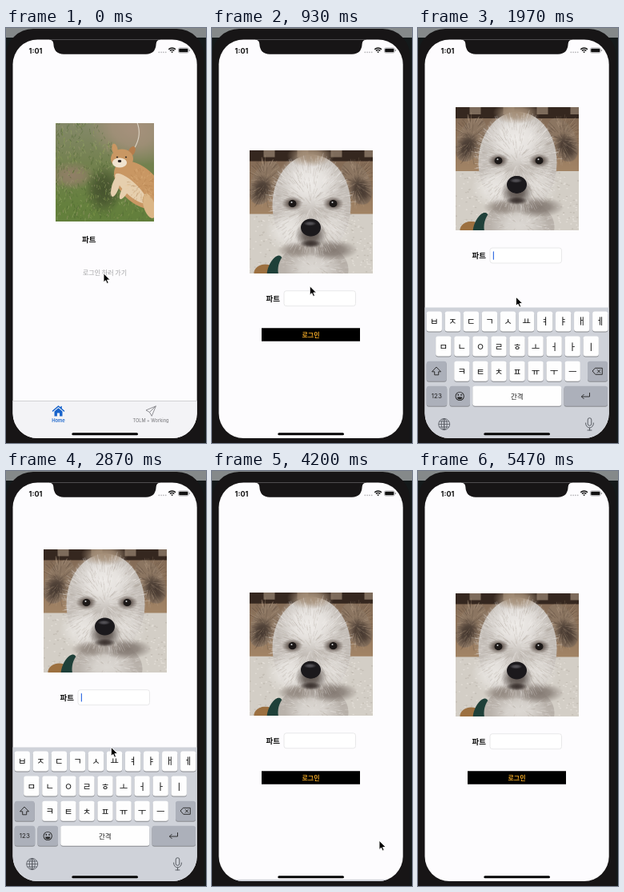
Recreate the animation shown at these times as an HTML page with a canvas. Size 250 by 519 pixels, loop 5510 ms.

```html
<!DOCTYPE html>
<html lang="ko">
<head>
<meta charset="utf-8">
<title>Login screen</title>
<style>
html, body { margin: 0; width: 100%; height: 100%; overflow: hidden; background: #171516; }
canvas { display: block; width: 250px; height: 519px; }
</style>
</head>
<body>
<canvas id="stage"></canvas>
<script>
const W = 250, H = 519, LOOP = 5510;
const SHEET_UP = 97, CARET_ON = 1640, KEYS_UP = 1663, KEYS_DOWN = 3868;
const SCREEN = { x: 8.5, y: 14.5, w: 230.2, h: 498.5 };
const KO = '"Noto Sans CJK KR", "Noto Sans CJK", sans-serif';
const LATIN = 'Inter, sans-serif';
const TAU = Math.PI * 2;
const dpr = window.devicePixelRatio || 1;

const canvas = document.getElementById('stage');
canvas.width = W * dpr;
canvas.height = H * dpr;
const main = canvas.getContext('2d');
let c = main;

// ---------- helpers ----------
function box(x, y, w, h, r, fill, stroke, lw = 1) {
  c.beginPath();
  c.roundRect(x, y, w, h, r);
  if (fill) { c.fillStyle = fill; c.fill(); }
  if (stroke) { c.strokeStyle = stroke; c.lineWidth = lw; c.stroke(); }
}

function band(y, h, fill) {
  c.fillStyle = fill;
  c.fillRect(0, y, W, h);
}

function text(str, x, cy, size, color, font = KO, weight = 400, align = 'center') {
  c.font = `${weight} ${size}px ${font}`;
  c.textAlign = align;
  c.fillStyle = color;
  c.fillText(str, x, cy + size * 0.37);
}

function icon(d, x, y, stroke, fill, lw = 0.9) {
  const p = new Path2D(d);
  c.save();
  c.translate(x, y);
  c.lineJoin = c.lineCap = 'round';
  if (fill) { c.fillStyle = fill; c.fill(p); }
  if (stroke) { c.strokeStyle = stroke; c.lineWidth = lw; c.stroke(p); }
  c.restore();
}

function oval(fill, x, y, rx, ry = rx, turn = 0) {
  c.beginPath();
  c.ellipse(x, y, rx, ry, turn, 0, TAU);
  c.fillStyle = fill;
  c.fill();
}

// oval that fades out towards its rim
function soft(color, x, y, rx, ry = rx, turn = 0) {
  const g = c.createRadialGradient(0, 0, 0, 0, 0, 1);
  g.addColorStop(0, color);
  g.addColorStop(0.45, color + 'cc');
  g.addColorStop(1, color + '00');
  c.save();
  c.translate(x, y);
  c.rotate(turn);
  c.scale(rx, ry);
  oval(g, 0, 0, 1);
  c.restore();
}

function fade(...colors) {
  const g = c.createLinearGradient(0, 0, 0, 154);
  colors.forEach((col, i) => g.addColorStop(i / (colors.length - 1), col));
  return g;
}

let seed = 71;
const rnd = () => (seed = (seed * 16807) % 2147483647) / 2147483647;
const pick = list => list[Math.floor(rnd() * list.length)];

function strand(color, x, y, dx, dy, lw) {
  c.strokeStyle = color;
  c.lineWidth = lw;
  c.beginPath();
  c.moveTo(x, y);
  c.lineTo(x + dx, y + dy);
  c.stroke();
}

// hairs growing outwards from the middle of an oval
function fur(colors, x, y, rx, ry, count, len) {
  c.globalAlpha = 0.3;
  for (let i = 0; i < count; i++) {
    const a = rnd() * TAU, r = Math.sqrt(rnd()), l = len * (0.5 + rnd());
    const dx = Math.cos(a), dy = Math.sin(a);
    strand(pick(colors), x + dx * rx * r, y + dy * ry * r, dx * l, dy * l, 0.8);
  }
  c.globalAlpha = 1;
}

function picture(size, paint) {
  const pic = document.createElement('canvas');
  pic.width = pic.height = Math.ceil(size * dpr * 2);
  c = pic.getContext('2d');
  c.scale(pic.width / size, pic.width / size);
  paint(size);
  c = main;
  return pic;
}

const clamp = u => Math.max(0, Math.min(1, u));
const spring = ms => {
  const u = Math.max(0, ms) * 0.01826;
  return 1 - (1 + u) * Math.exp(-u);
};

// ---------- photographs ----------
const lawnPhoto = picture(123, s => {
  band(0, s, fade('#85896a', '#73814f', '#65803e', '#5f7d38'));
  soft('#a6917c', 96, 8, 58, 44, 0.3);
  soft('#917f67', 20, 66, 30, 18);
  soft('#47532f', 60, 84, 24, 32);
  const blades = ['#465f2b', '#8ca052', '#9bab6c', '#596f3b', '#a59b79'];
  c.globalAlpha = 0.5;
  for (let i = 0; i < 900; i++) {
    const x = rnd() * s, y = rnd() * s;
    if (y > x - 45) strand(pick(blades), x, y, rnd() * 5 - 2.5, -1 - rnd() * 4, 0.9);
  }
  c.globalAlpha = 1;
  icon('M102 0 Q109 18 95 37', 0, 0, '#ded5c6', null, 1.1);
  const tan = '#c99763', cream = '#e6cfae';
  oval(tan, 104, 78, 37, 22, 0.75);
  oval(cream, 94, 82, 26, 8, 0.75);
  oval(cream, 75, 79, 4.5, 14, 0.3);
  oval(cream, 87, 84, 4, 13, 0.5);
  oval('#dbb687', 117, 104, 7, 16, -0.3);
  oval(tan, 74, 33, 3.5, 7, -0.2);
  oval('#b57d4c', 95, 36, 4, 7, 0.5);
  oval(tan, 83, 45, 14, 12);
  oval('#f0e3cf', 80, 50, 9, 6);
  for (const x of [77, 88]) oval('#2e2520', x, 43, 1.2, 0.9);
  oval('#2c2422', 80, 48, 2.2, 1.6);
  fur(['#edca96', '#a77342'], 108, 78, 18, 18, 120, 3);
});

const puppyPhoto = picture(154, s => {
  band(0, s, fade('#7d6653', '#a18365', '#b5854f'));
  band(0, 14, '#35271f');
  for (let x = 18; x < s; x += 42) box(x, 0, 14, 9, 0, '#7d6b5b');
  band(80, s, '#d3cec6');
  for (let i = 0; i < 300; i++) oval(pick(['#e2ddd6', '#c4beb5']), rnd() * s, 82 + rnd() * 72, 1.2, 0.8);
  oval('#9c7040', 20, 154, 14, 11);
  oval('#1f4039', 32, 148, 8, 17, 0.4);

  const white = ['#f8f6f3', '#e9e6e1', '#a89f96'];
  oval('#b9b2ab', 80, 150, 44, 34);
  soft('#dcd8d3', 80, 148, 36, 24);
  fur(white, 80, 146, 40, 24, 160, 5);
  for (const side of [-1, 1]) {
    const x = 77 + side * 57;
    oval('#8b7561', x, 41, 17, 29, side * -0.45);
    soft('#453830', x + side * 5, 50, 14, 20, side * -0.45);
    fur(['#bda68e', '#4c3d32', '#937d68'], x, 41, 16, 25, 220, 7);
  }
  oval('#c4beb8', 78, 69, 49, 63);
  soft('#eeebe8', 76, 40, 42, 38);
  soft('#a58f78', 77, 7, 30, 14);
  soft('#eae7e3', 50, 100, 30, 27);
  soft('#dfdbd6', 103, 99, 26, 25);
  soft('#847a73', 104, 125, 32, 13);
  soft('#958b83', 59, 125, 24, 10);
  fur(white, 77, 69, 48, 58, 900, 7);
  for (const x of [54, 105]) {
    soft('#5d514a', x, 67, 13, 9);
    oval('#1c1817', x, 67, 5, 4.6);
    oval('#d5d8da', x - 1, 65.5, 1);
  }
  soft('#5b524d', 77, 106, 20, 18);
  oval('#1b191c', 77, 97, 12.5, 11);
  soft('#57555a', 76, 92, 8, 3);
  soft('#3b322f', 77, 117, 13, 5);
});

// ---------- screens ----------
function home() {
  band(14, 500, '#fdfcfe');
  c.drawImage(lawnPhoto, 62, 118.5, 123, 123);
  text('파트', 95, 264, 9.5, '#111', KO, 700, 'left');
  text('로그인 하러 가기', 123.5, 306, 8, '#a3a3a5');
  band(466, 50, '#f3f3f6');
  band(466, 0.7, '#c3c3c6');
  const blue = '#1763cb', gray = '#858589';
  icon('M-7 0 L0 -6 L7 0 M3.6 -5.5 V-3', 65.5, 479, blue, null, 1.5);
  icon('M-5 .5 L0 -3.8 L5 .5 V6.5 H1.6 V2.5 H-1.6 V6.5 H-5 Z', 65.5, 479, null, blue);
  text('Home', 65.5, 491, 5.8, blue, LATIN, 600);
  icon('M6 -6 L-6 -1 L-1.5 1.5 L1 6 Z L-1.5 1.5', 181, 479, gray);
  text('TOLM + Working', 181, 491, 5.6, gray, LATIN, 500);
}

function login(t, keys) {
  band(14, 520, '#fdfcfe');
  box(62, 375.3, 123, 16.4, 0, '#000');
  text('로그인', 123.5, 383.7, 8, '#e5a023', KO, 700);
  c.save();
  c.translate(0, -55 * keys);
  c.drawImage(puppyPhoto, 46.5, 152.5, 154, 154);
  text('파트', 67.5, 338, 9.5, '#111', KO, 700, 'left');
  box(90, 328.7, 89.5, 19, 3, '#fff', '#e2e2e4', 0.8);
  if (t > CARET_ON && t < KEYS_DOWN) {
    c.globalAlpha = clamp(0.8 + 3 * Math.sin((t - CARET_ON) / 1060 * TAU));
    box(93.8, 333, 1.2, 10.5, 0.6, '#3970e3');
  }
  c.restore();
}

// ---------- keyboard ----------
const PITCH = 23.05, ROW = 31.1, DARK = '#acb0ba', INK = '#222';
const rowY = r => 5 + r * ROW;

function key(x, r, w, label, size = 11.5, fill = '#fefefe') {
  const y = rowY(r);
  box(x, y + 1, w, 25, 3, '#898b90');
  box(x, y, w, 25, 3, fill);
  if (label) text(label, x + w / 2, y + 12.7, size, '#111');
}

function face(x, y) {
  oval(INK, x, y, 5.6);
  oval(DARK, x, y, 4.7);
  for (const side of [-1, 1]) oval(INK, x + side * 1.9, y - 1.7, 0.8, 1.1);
  icon('M-3 0 H3 A3 3 0 0 1 -3 0 Z', x, y + 1, null, INK);
}

function globe(x, y, r, color) {
  c.strokeStyle = color;
  c.lineWidth = 0.8;
  for (const k of [1, 0.5, 0]) {
    c.beginPath();
    c.ellipse(x, y, r * k, r, 0, 0, TAU);
    c.stroke();
  }
  for (const k of [-0.5, 0, 0.5]) {
    const half = r * Math.sqrt(1 - k * k);
    strand(color, x - half, y + r * k, 2 * half, 0, 0.8);
  }
}

function keyboard(top) {
  c.save();
  c.translate(0, top);
  band(0, 190, '#cfd2d9');
  ['ㅂㅈㄷㄱㅅㅛㅕㅑㅐㅔ', 'ㅁㄴㅇㄹㅎㅗㅓㅏㅣ', 'ㅋㅌㅊㅍㅠㅜㅡ'].forEach((row, r) => {
    const left = 125.9 - row.length * PITCH / 2;
    [...row].forEach((ch, i) => key(left + i * PITCH, r, 19.3, ch));
  });
  for (const x of [10.7, 212]) key(x, 2, 25, '', 0, DARK);
  for (const x of [10.7, 39.5]) key(x, 3, 25.5, '', 0, DARK);
  key(68.3, 3, 111, '간격', 8.5);
  key(182.5, 3, 54.5, '', 0, DARK);
  text('123', 23.4, 111, 8, INK, LATIN);
  face(52.2, 111);
  icon('M0 -5 L5.3 .5 H2.5 V4.5 H-2.5 V.5 H-5.3 Z', 23.2, 79.8, INK);
  icon('M-2.5 -4 H6 V4 H-2.5 L-6 0 Z M0 -1.8 L3.5 1.8 M3.5 -1.8 L0 1.8', 224.3, 79.8, INK);
  icon('M5 -3.5 V1 H-5 M-2.3 -1.7 L-5 1 L-2.3 3.7', 209.5, 110.5, INK);
  const gray = '#50545b';
  globe(32.7, 146, 7, gray);
  box(212.2, 138.2, 4.6, 9.6, 2.3, null, gray, 0.9);
  icon('M-5 -1 A5 6 0 0 0 5 -1 M0 5 V8 M-2.5 8 H2.5', 214.5, 145.5, gray);
  c.restore();
}

// ---------- pointer ----------
const easeIn = u => u * u, easeOut = u => 1 - (1 - u) ** 3, smooth = u => u * u * (3 - 2 * u);
const moves = [
  { from: 720, to: 1120, x: 122.5, y: 336.5, ease: smooth },
  { from: 2700, to: 2870, x: 131, y: 345, ease: easeIn },
  { from: 2870, to: 3500, x: 209, y: 462.5, ease: easeOut },
  { from: 4600, to: 5060, x: 256, y: 446, ease: smooth },
];

function pointer(t) {
  let x = 122, y = 307;
  for (const m of moves) {
    const k = m.ease(clamp((t - m.from) / (m.to - m.from)));
    x += (m.x - x) * k;
    y += (m.y - y) * k;
  }
  icon('M0 0 V11 L2.5 8.7 L4.3 12.6 L6.2 11.8 L4.5 8 H8 Z', x, y, '#fff', '#000');
}

// ---------- device ----------
const BODY = '#171516';
const notch = new Path2D('M54 13 V14.5 Q59 15 59.3 19.5 Q60 32.7 72 32.7 H175 Q187 32.7 187.7 19.5 Q188 15 193 14.5 V13 Z');

function device() {
  band(0, H, '#14191a');
  band(0, 12, '#85898a');
  box(0, 1, 247.5, H + 40, 34, BODY);
}

function statusBar() {
  text('1:01', 28.6, 28.4, 9, '#111', LATIN, 700, 'left');
  for (let i = 0; i < 4; i++) oval('#b3b3b6', 191.3 + i * 2.8, 30.3, 0.85);
  c.strokeStyle = '#111';
  c.lineWidth = 1.5;
  for (const r of [1.2, 3.8, 6.2]) {
    c.beginPath();
    c.arc(207.6, 31.2, r, -Math.PI * 0.75, -Math.PI * 0.25);
    c.stroke();
  }
  box(215.4, 24.9, 12.8, 6.2, 1.8, null, '#8c8c8f', 0.6);
  box(216.2, 25.7, 11.2, 4.6, 1.1, '#111');
  box(229, 27, 0.9, 2.1, 0.5, '#8c8c8f');
}

function draw(t) {
  c.setTransform(dpr, 0, 0, dpr, 0, 0);
  device();
  c.save();
  c.beginPath();
  c.roundRect(SCREEN.x, SCREEN.y, SCREEN.w, SCREEN.h, 31);
  c.clip();
  const sheet = spring(t - SHEET_UP);
  const keys = spring(t - KEYS_UP) * (1 - spring(t - KEYS_DOWN));
  if (sheet < 0.999) home();
  c.save();
  c.translate(0, 500 * (1 - sheet));
  login(t, keys);
  c.restore();
  if (keys > 0.001) keyboard(345.5 + 168 * (1 - keys));
  statusBar();
  c.fillStyle = BODY;
  c.fill(notch);
  box(82.3, 506.3, 82.7, 3, 1.5, '#050505');
  c.restore();
  pointer(t);
}

const start = performance.now();
function tick() {
  draw((performance.now() - start) % LOOP);
  requestAnimationFrame(tick);
}
tick();
</script>
</body>
</html>
```
